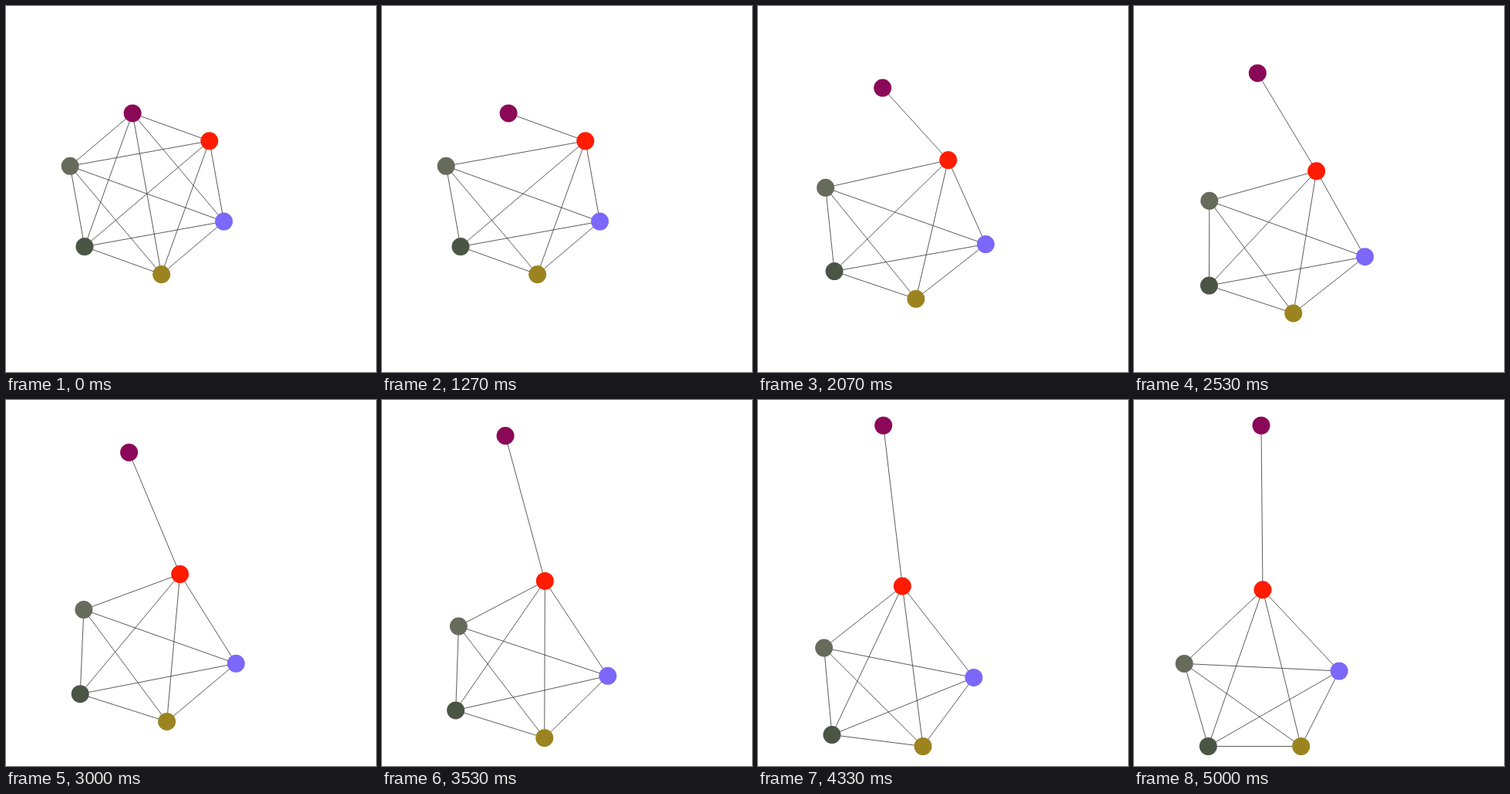
An HTML page with a canvas that plays this animation: 480 by 474 pixels, repeating every 5.07 s.

```html
<!DOCTYPE html>
<html lang="en">
<head>
<meta charset="utf-8">
<title>Graph layout</title>
<style>
html, body { margin: 0; overflow: hidden; background: #fff; }
canvas { display: block; }
</style>
</head>
<body>
<canvas id="stage" width="480" height="474"></canvas>
<script>
const ctx = document.getElementById('stage').getContext('2d');
const LOOP = 5070, STEP = 200 / 3, RELEASE = 19, LAST = 75;
const RADIUS = 11.5, TOP = 33, BOTTOM = 448.5;

// Each node leaves its hexagon corner along a few waypoints, evenly spaced in time.
// Waypoints outside the walls keep the speed up until the node is stopped there.
const nodes = [
  { color: '#8b0858', path: [[159.6, 62.5], [165, -13]] },
  { color: '#ff1c00', path: [[222.3, 228.3], [167, 245.8]] },
  { color: '#7b68fa', path: [[299.5, 324], [290, 361], [266.2, 351]] },
  { color: '#9b8420', path: [[216.7, 496]] },
  { color: '#4b5545', path: [[96, 386], [96.3, 460]] },
  { color: '#676b5b', path: [[84.5, 229], [97.5, 251.5], [101, 277], [97, 301.5], [84.5, 322.5], [65.2, 341.4]] }
];
nodes.forEach((node, i) => {
  const angle = (60 * i - 100.2) * Math.PI / 180;
  node.path.unshift([182.9 + 106 * Math.cos(angle), 243.2 + 106 * Math.sin(angle)]);
});

// Catmull-Rom spline; u runs from 0 to 1, missing neighbours are mirrored
function along(path, u, axis) {
  const last = path.length - 1;
  const i = Math.min(Math.floor(u * last), last - 1);
  const s = u * last - i, r = 1 - s;
  const b = path[i][axis], c = path[i + 1][axis];
  const a = i > 0 ? path[i - 1][axis] : 2 * b - c;
  const d = i + 2 <= last ? path[i + 2][axis] : 2 * c - b;
  return r * r * (1 + 2 * s) * b + s * s * (3 - 2 * s) * c
    + s * r * (r * (c - a) - s * (d - b)) / 2;
}

function draw(step) {
  const released = step >= RELEASE;
  const u = released ? (step - RELEASE) / (LAST - RELEASE) : 0;
  const points = nodes.map(({ path }) =>
    [along(path, u, 0), Math.min(Math.max(along(path, u, 1), TOP), BOTTOM)]);

  ctx.fillStyle = '#fff';
  ctx.fillRect(0, 0, 480, 474);

  ctx.strokeStyle = '#333';
  ctx.lineWidth = 0.8;
  ctx.beginPath();
  for (let a = 0; a < points.length; a++) {
    for (let b = a + 1; b < points.length; b++) {
      // After the release the first node keeps a single link
      if (released && a === 0 && b > 1) continue;
      ctx.moveTo(...points[a]);
      ctx.lineTo(...points[b]);
    }
  }
  ctx.stroke();

  points.forEach(([x, y], i) => {
    ctx.fillStyle = nodes[i].color;
    ctx.beginPath();
    ctx.arc(x, y, RADIUS, 0, 2 * Math.PI);
    ctx.fill();
  });
}

const start = performance.now();
function tick() {
  const t = (performance.now() - start) % LOOP;
  draw(Math.min(Math.floor((t + 5) / STEP), LAST));
  requestAnimationFrame(tick);
}
tick();
</script>
</body>
</html>
```
